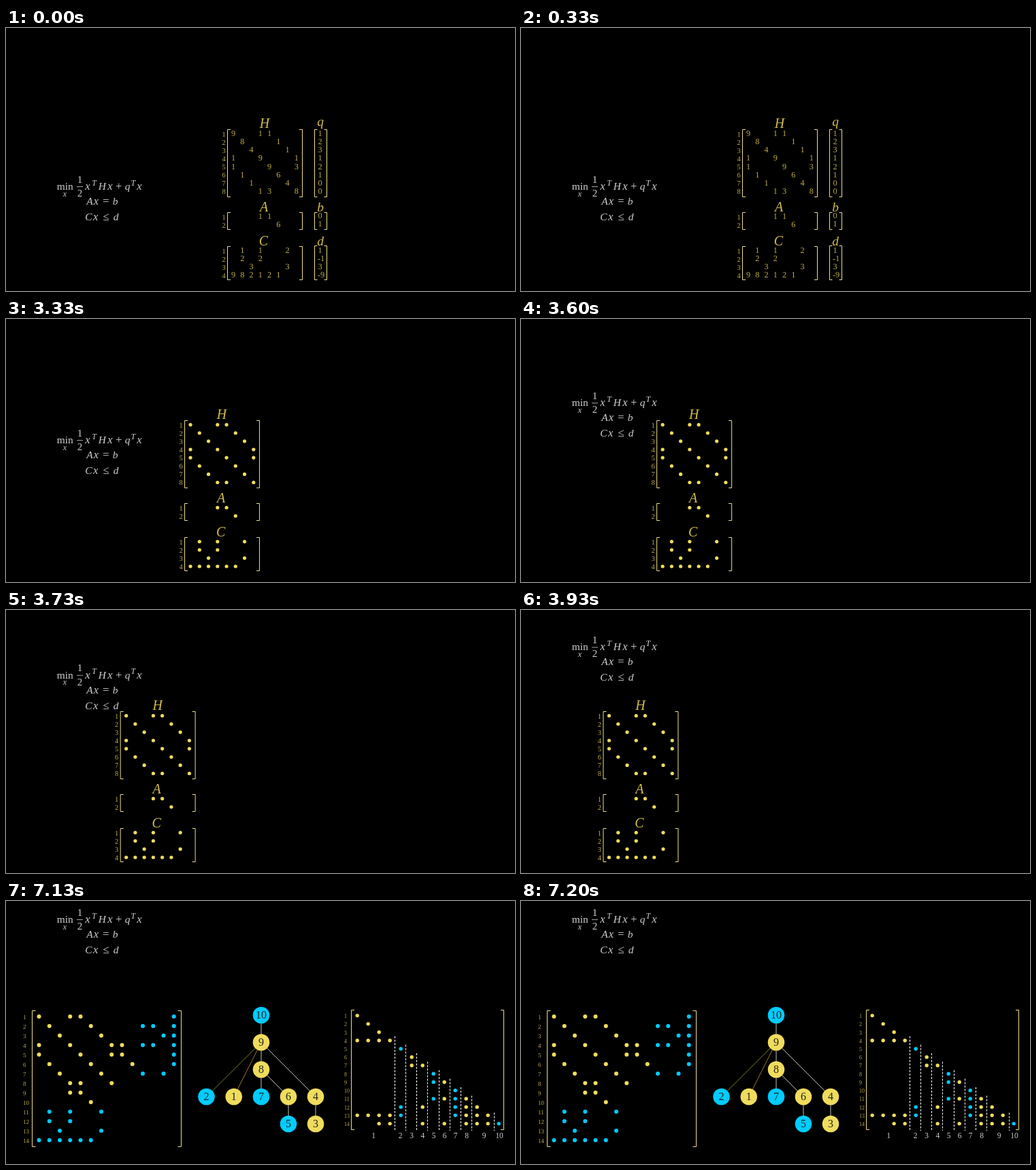
An HTML page with a canvas for the animation above (8 s loop, 748x387 px).

```html
<!DOCTYPE html>
<html lang="en">
<head>
<meta charset="utf-8">
<title>Sparse quadratic program</title>
<style>
html, body { margin: 0; width: 100%; height: 100%; overflow: hidden; background: #000; }
canvas { display: block; width: 748px; height: 387px; }
</style>
</head>
<body>
<canvas id="stage" width="748" height="387"></canvas>
<script>
const ctx = document.getElementById('stage').getContext('2d');
const YELLOW = '#f0dc5c', BLUE = '#00ccff', WHITE = '#fff', BRACKET = '#f0e08a';
const TITLE = '#d2be4e', DIGIT = '#bfac48', MATH = '#cfcfd2';
const SERIF = '"Liberation Serif", "Times New Roman", serif';
const LOOP = 8000, SLIDE = 3065, KKT = 4065, TREE = 7125;
const FRAME = 1000 / 15, SLIDE_FRAMES = 15;

// Cells: digits are entries, dots are empty
const H = ['9..11', '.8...1', '..4...1', '1..9...1', '1...9..3', '.1...6', '..1...4', '...13..8'];
const A = ['...11', '.....6'];
const C = ['.1.1..2', '.2.2', '..3...3', '982121'];
// Patterns: y yellow, b blue
const K = [
  'y..yy........b', '.y...y....bb.b', '..y...y.....bb', 'y..y...yy.bb.b',
  'y...y..yy....b', '.y...y...y...b', '..y...y...b.b.', '...yy..y', '...yy', '.....y',
  '.b.b..b', '.b.b', '..b...b', 'bbbbbb'
];
const L = [
  'y', '.y', '..y', 'yyyy', '....b', '.....y', '.....yy', '.......b', '.......by',
  '.........b', '.......byby', '....b.y..byy', 'yyyyb....byyy', '..yy..y.y.yyyb'
];

const NODES = {
  10: [375, 168, BLUE], 9: [375, 208, YELLOW], 8: [375, 248, YELLOW],
  2: [294.5, 288, BLUE], 1: [334.8, 288, YELLOW], 7: [375, 288, BLUE],
  6: [415, 288, YELLOW], 4: [455, 288, YELLOW], 5: [415, 328, BLUE], 3: [455, 328, YELLOW]
};
const EDGES = [[10, 9], [9, 8], [9, 2, '#84901e'], [9, 1, '#ae8540'], [9, 4], [8, 7], [8, 6], [6, 5], [4, 3]];

function text(s, x, y, size, color, { italic = false, align = 'center' } = {}) {
  ctx.font = `${italic ? 'italic ' : ''}${size}px ${SERIF}`;
  ctx.fillStyle = color;
  ctx.textAlign = align;
  ctx.fillText(s, x, y);
}

// Digits centred on y
function num(s, x, y, size, color, align) {
  text(s, x, y + size * 0.33, size, color, { align });
}

function dot(x, y, r, color) {
  ctx.fillStyle = color;
  ctx.beginPath();
  ctx.arc(x, y, r, 0, 2 * Math.PI);
  ctx.fill();
}

function line(x1, y1, x2, y2, color, width = 1) {
  ctx.strokeStyle = color;
  ctx.lineWidth = width;
  ctx.beginPath();
  ctx.moveTo(x1, y1);
  ctx.lineTo(x2, y2);
  ctx.stroke();
}

function brackets(left, right, top, bottom, tick) {
  ctx.strokeStyle = BRACKET;
  ctx.lineWidth = 1;
  ctx.beginPath();
  for (const [x, d] of [[left, tick], [right, -tick]]) {
    ctx.moveTo(x + d, top);
    ctx.lineTo(x, top);
    ctx.lineTo(x, bottom);
    ctx.lineTo(x + d, bottom);
  }
  ctx.stroke();
}

function eachCell(rows, fn) {
  rows.forEach((row, i) => [...row].forEach((c, j) => { if (c !== '.') fn(c, j, i); }));
}

function formula(dy) {
  const it = (s, x, y, size = 15.5) => text(s, x, y + dy, size, MATH, { italic: true });
  const up = (s, x, y, size = 15.5) => text(s, x, y + dy, size, MATH);
  up('min', 86.7, 32);
  it('x', 86.5, 41.5, 12);
  up('1', 108.5, 21.5, 15);
  line(104, 27.5 + dy, 113, 27.5 + dy, MATH, 0.8);
  up('2', 108.5, 42, 15);
  it('x', 120, 32, 16.5);
  it('T', 129.5, 25.5, 12);
  it('H', 141.3, 32);
  it('x', 153, 32, 16.5);
  up('+', 165.7, 32, 17);
  it('q', 178.5, 32);
  it('T', 186.8, 25.5, 12);
  it('x', 196, 32, 16.5);
  it('A', 123, 54);
  it('x', 132.5, 54, 16.5);
  up('=', 146.7, 54, 17);
  it('b', 160.5, 54);
  it('C', 121.5, 77);
  it('x', 131.7, 77, 16.5);
  up('≤', 147, 77, 17);
  it('d', 161.5, 77);
}

function block(name, rows, dx, nameX, nameY, top, bottom, rowY, dots, color) {
  text(name, nameX + dx, nameY, 20, TITLE, { italic: true });
  brackets(325.5 + dx, 435.5 + dx, top, bottom, 4.5);
  rows.forEach((_, i) => num(i + 1, 320 + dx, rowY + 0.5 + i * 12.13, 10.5, DIGIT));
  eachCell(rows, (c, j, i) => {
    const x = 334 + dx + j * 13.25, y = rowY + i * 12.13;
    if (dots) dot(x, y, 2.6, color);
    else num(c, x, y - 0.6, 12.3, DIGIT);
  });
}

function blocks(dx, dots, cColor) {
  block('H', H, dx, 380, 147, 149.5, 248.5, 155.6, dots, YELLOW);
  block('A', A, dx, 379, 270, 271.5, 296.5, 277.6, dots, YELLOW);
  block('C', C, dx, 378.5, 319.5, 321.5, 370.5, 327.6, dots, cColor);
}

function vector(name, values, nameY, top, bottom, rowY) {
  text(name, 462, nameY, 19.5, TITLE, { italic: true });
  brackets(453.5, 471.5, top, bottom, 4);
  values.forEach((v, i) => num(v, v < 0 ? 463 : 461.5, rowY - 0.6 + i * 12.13, 12.3, DIGIT));
}

function pattern(rows, x0, y0, stepX, stepY, r, labelX, size) {
  rows.forEach((_, i) => num(i + 1, labelX, y0 + 0.8 + i * stepY, size, DIGIT, 'left'));
  eachCell(rows, (c, j, i) => dot(x0 + j * stepX, y0 + i * stepY, r, c === 'b' ? BLUE : YELLOW));
}

function kkt(dx) {
  brackets(274.5 + dx, 493.5 + dx, 161.5, 361.5, 5);
  pattern(K, 284.5 + dx, 170, 15.25, 14, 3, 261 + dx, 9);
}

function tree() {
  for (const [a, b, color = '#d8d8d0'] of EDGES) {
    const [x1, y1] = NODES[a], [x2, y2] = NODES[b];
    line(x1, y1, x2, y2, color, 0.9);
  }
  for (const [name, [x, y, color]] of Object.entries(NODES)) {
    dot(x, y, 12.3, color);
    num(name, x, y, 16, '#222');
  }
}

function factor() {
  brackets(507.5, 731.5, 160.5, 336.5, 4.5);
  pattern(L, 516.2, 168.6, 16, 12.23, 2.7, 497, 8);
  ctx.setLineDash([3, 2]);
  for (const k of [0, 1, 2, 3, 4, 5, 6, 7, 9]) {
    const x = Math.floor(572 + 16.25 * k) - 0.5;
    line(x, 199 + 12.5 * k, x, 338, WHITE);
  }
  ctx.setLineDash([]);
  [540, 579.5, 596, 612.3, 628.5, 644.5, 660.7, 677, 702.5, 725]
    .forEach((x, i) => num(i + 1, x, 345.5, 11.5, MATH));
}

function draw(t) {
  ctx.fillStyle = '#000';
  ctx.fillRect(0, 0, 748, 387);
  const step = Math.floor((t - SLIDE + 5) / FRAME);
  const p = Math.min(1, Math.max(0, step / SLIDE_FRAMES));
  formula(206 * (1 - p));
  if (t >= TREE) {
    kkt(-236);
    tree();
    factor();
    return;
  }
  blocks(-236 * p, t >= SLIDE, t >= KKT ? BLUE : YELLOW);
  if (t < SLIDE) {
    vector('q', [1, 2, 3, 1, 2, 1, 0, 0], 143.5, 149.5, 248.5, 155.6);
    vector('b', [0, 1], 270, 271.5, 296.5, 276.8);
    vector('d', [1, -1, 3, -9], 319.5, 320.5, 370.5, 327.6);
  }
  if (t >= KKT) kkt(0);
}

const start = performance.now();
function tick() {
  draw((performance.now() - start) % LOOP);
  requestAnimationFrame(tick);
}
tick();
</script>
</body>
</html>
```
